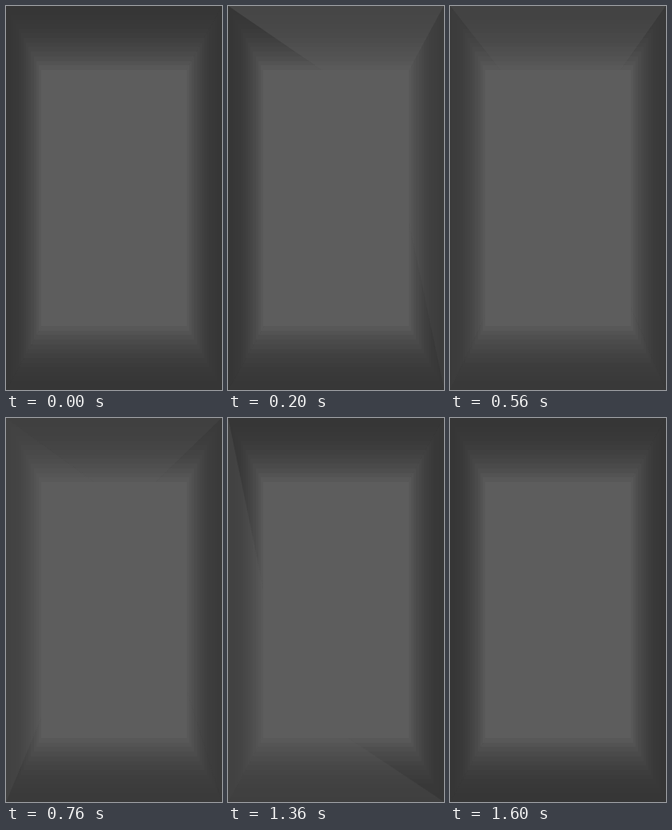
An HTML page with a canvas for the animation above (1.64 s loop, 270x480 px).

```html
<!DOCTYPE html>
<html lang="en">
<head>
<meta charset="utf-8">
<title>Bevelled panel</title>
<style>
html, body { margin: 0; width: 100%; height: 100%; overflow: hidden; background: #363636; }
canvas { display: block; width: 100vw; height: 100vh; }
</style>
</head>
<body>
<canvas id="stage" width="270" height="480"></canvas>
<script>
const W = 270, H = 480, LOOP = 1640, STEP = 40;
const BEVEL_X = 44, BEVEL_Y = 80, RINGS = 14, CENTER = 93;
const ctx = document.getElementById('stage').getContext('2d');

// Pyramid apex and the shade of its top, right, bottom and left faces.
const poses = [
  { at: 0,    apex: [270, 0],   shades: [71, 64, 54, 54] },
  { at: 80,   apex: [236, 74],  shades: [71, 63, 54, 54] },
  { at: 400,  apex: [132, 236], shades: [69, 55, 56, 54] },
  { at: 760,  apex: [154, 112], shades: [64, 58, 58, 66] },
  { at: 1080, apex: [130, 238], shades: [54, 56, 59, 67] },
  { at: 1520, apex: [39, 411],  shades: [54, 54, 66, 65] },
  { at: 1600, apex: [0, 480],   shades: [54, 54, 64, 64] }
];
const corners = [[0, 0], [W, 0], [W, H], [0, H]];

const mix = (a, b, k) => a + (b - a) * k;
const mixAll = (a, b, k) => a.map((v, i) => mix(v, b[i], k));
const gray = v => `rgb(${[v, v, v].map(Math.round).join()})`;

function poseAt(t) {
  const next = poses.findIndex(p => p.at > t);
  if (next < 0) return poses[poses.length - 1];
  const a = poses[next - 1], b = poses[next];
  const k = (t - a.at) / (b.at - a.at);
  return { apex: mixAll(a.apex, b.apex, k), shades: mixAll(a.shades, b.shades, k) };
}

function triangle(a, b, c, color) {
  ctx.beginPath();
  [a, b, c].forEach(p => ctx.lineTo(...p));
  ctx.closePath();
  ctx.fillStyle = ctx.strokeStyle = color;
  ctx.lineWidth = 0.5;
  ctx.fill();
  ctx.stroke();
}

function draw(t) {
  const { apex, shades } = poseAt(t);
  for (let ring = 0; ring < RINGS; ring++) {
    const x = Math.round(BEVEL_X * ring / RINGS);
    const y = Math.round(BEVEL_Y * ring / RINGS);
    const blend = Math.pow(ring / RINGS, 2);
    ctx.save();
    ctx.beginPath();
    ctx.rect(x, y, W - 2 * x, H - 2 * y);
    ctx.clip();
    // Faces seen edge-on have no area and are skipped.
    shades.forEach((shade, i) => {
      const a = corners[i], b = corners[(i + 1) % 4];
      const area = (b[0] - a[0]) * (apex[1] - a[1]) - (b[1] - a[1]) * (apex[0] - a[0]);
      if (area > 1) triangle(a, b, apex, gray(mix(shade, CENTER, blend)));
    });
    ctx.restore();
  }
  ctx.fillStyle = gray(CENTER);
  ctx.fillRect(BEVEL_X, BEVEL_Y, W - 2 * BEVEL_X, H - 2 * BEVEL_Y);
}

function tick() {
  const t = performance.now() % LOOP;
  draw(Math.floor(t / STEP) * STEP);
  requestAnimationFrame(tick);
}
tick();
</script>
</body>
</html>
```
